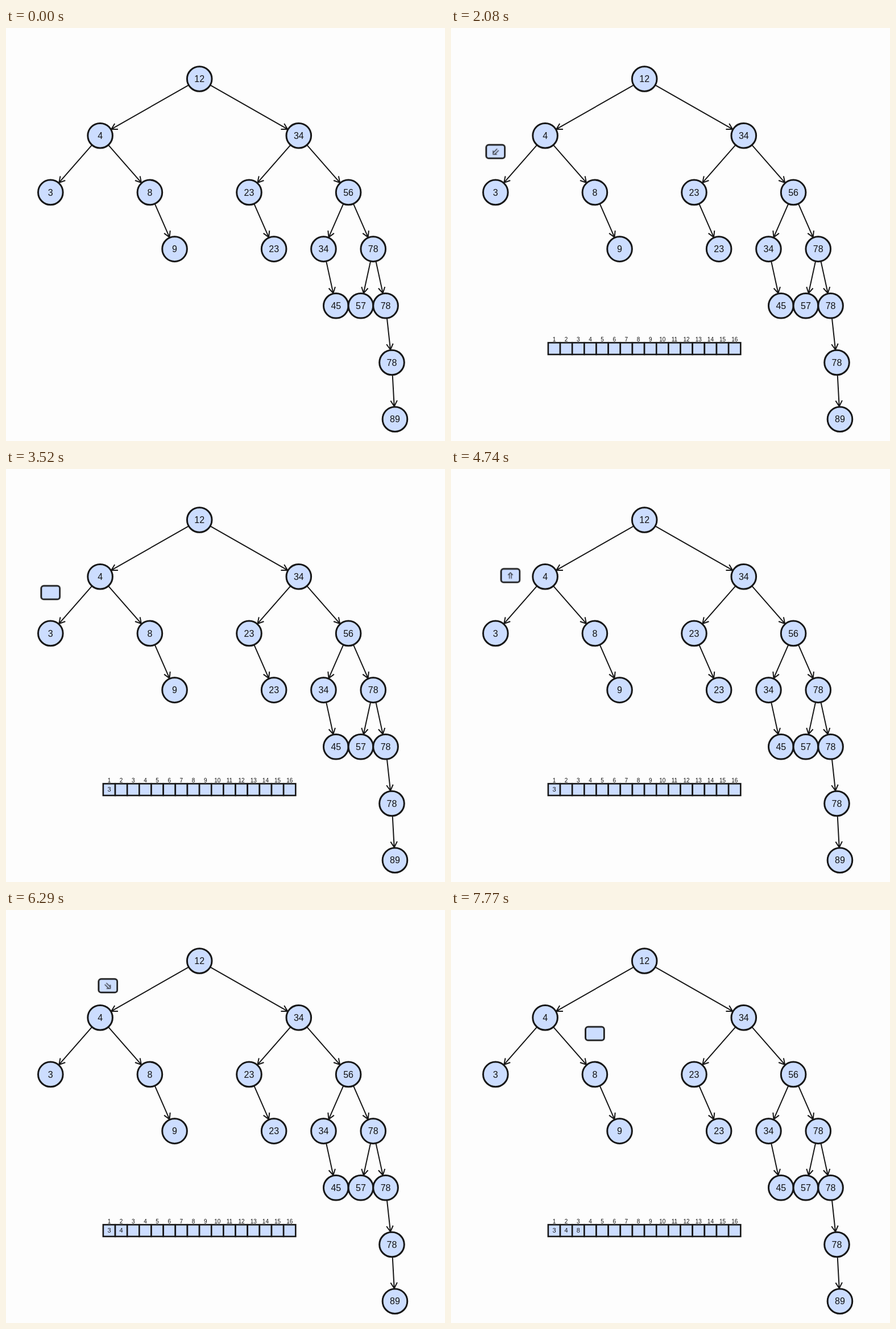
Recreate the animation shown at these times as an HTML page. Size 772 px wide and 726 px high, loop 8 s.

```html
<!DOCTYPE html>
<html lang="en">
<head>
<meta charset="utf-8">
<title>In-order tree walk</title>
<style>
html, body { margin: 0; width: 100%; height: 100%; overflow: hidden; background: #fdfdfd; }
svg { display: block; }
text { font: 16px "Liberation Sans", Arial, sans-serif; text-anchor: middle; fill: #111; stroke: none; }
.small text { font-size: 10px; }
.small .value { font-size: 11px; }
circle, rect { fill: #cdf; stroke: #171717; stroke-width: 3; }
.small rect { stroke-width: 2.6; }
.line { fill: none; stroke: #171717; stroke-width: 2; }
.sign path { fill: none; stroke: #171717; stroke-width: 1.1; }
.sign .strike { stroke-width: 1.5; }

/* One 8 s clock; the small lead keeps step edges clear of frame times. */
.a { animation: 8s step-end -5ms infinite; }
#array { animation-name: array; }
#box { animation-name: box, box-on; }
#left { animation-name: left; }
#right { animation-name: right; }
#up { animation-name: up; }
#strike { animation-name: strike; }
#ball3 { animation-name: ball3, ball3-on; }
#ball4 { animation-name: ball4, ball4-on; }
#ball8 { animation-name: ball8, ball8-on; }
#val3 { animation-name: val3; }
#val4 { animation-name: val4; }
#val8 { animation-name: val8; }

@keyframes array { 0% { opacity: 0 } 10.25%, 100% { opacity: 1 } }
@keyframes box-on { 0% { opacity: 0 } 10.875%, 100% { opacity: 1 } }
@keyframes left { 0%, 33.375%, 87.75%, 100% { opacity: 0 } 14.375%, 80.375% { opacity: 1 } }
@keyframes right { 0%, 55%, 80.375%, 100% { opacity: 0 } 47.625%, 74.75% { opacity: 1 } }
@keyframes up { 0%, 61.125%, 100% { opacity: 0 } 55% { opacity: 1 } }
@keyframes strike {
  0%, 33.375%, 55%, 87.75%, 100% { opacity: 0 }
  29.875%, 51.375%, 84% { opacity: 1 }
}
@keyframes box {
  0% { transform: translate(340.2px, 17.8px) }
  18.75% { transform: translate(340.2px, 17.8px); animation-timing-function: steps(6, jump-start) }
  21% { transform: translate(165.6px, 117.5px) }
  24.625% { transform: translate(165.6px, 117.5px); animation-timing-function: steps(5, jump-start) }
  26.3125% { transform: translate(78.3px, 217.2px) }
  59.25% { transform: translate(84.1px, 210.6px); animation-timing-function: steps(4, jump-start) }
  60.75% { transform: translate(165.6px, 117.5px) }
  78.625% { transform: translate(160.9px, 112.1px); animation-timing-function: steps(5, jump-start) }
  80.375%, 100% { transform: translate(252.9px, 217.2px) }
}
@keyframes ball3-on { 0%, 44%, 100% { opacity: 0 } 34.125% { opacity: 1 } }
@keyframes ball3 {
  0% { transform: translate(78.3px, 288.9px) }
  38% { transform: translate(79.9px, 290.3px); animation-timing-function: steps(10, jump-start) }
  42.5833%, 100% { transform: translate(340.2px, 519.6px) }
}
@keyframes ball4-on { 0%, 71.125%, 100% { opacity: 0 } 61.125% { opacity: 1 } }
@keyframes ball4 {
  0% { transform: translate(165.6px, 189.2px) }
  65% { transform: translate(169.5px, 196.7px); animation-timing-function: steps(12, jump-start) }
  69.5%, 100% { transform: translate(340.2px, 519.6px) }
}
@keyframes ball8-on { 0%, 97.125%, 100% { opacity: 0 } 88.375% { opacity: 1 } }
@keyframes ball8 {
  0% { transform: translate(252.9px, 288.9px) }
  92.25% { transform: translate(252.9px, 288.9px); animation-timing-function: steps(8, jump-start) }
  95.25%, 100% { transform: translate(340.2px, 519.6px) }
}
@keyframes val3 { 0% { opacity: 0 } 44%, 100% { opacity: 1 } }
@keyframes val4 { 0% { opacity: 0 } 71.125%, 100% { opacity: 1 } }
@keyframes val8 { 0% { opacity: 0 } 97.125%, 100% { opacity: 1 } }
</style>
</head>
<body>
<svg width="772" height="726" viewBox="0 0 772 726">
  <defs>
    <path id="arrow" d="M-1.7 5.4V-3.6M1.7 5.4V-3.6M-4.3 -1L0 -5.4L4.3 -1"/>
  </defs>
  <g id="edges" class="line"></g>
  <g id="nodes"></g>
  <g id="array" class="a small"></g>
  <g id="box" class="a">
    <rect x="-16.4" y="-11.9" width="32.8" height="23.8" rx="4.5" style="stroke-width:2.8"/>
    <g class="sign">
      <g id="left" class="a"><path transform="translate(0 .7) rotate(-135) scale(1.1)" d="M-1.7 5.4V-3.6M1.7 5.4V-3.6M-4.3 -1L0 -5.4L4.3 -1"/></g>
      <g id="right" class="a"><path transform="translate(0 .7) rotate(135) scale(1.1)" d="M-1.7 5.4V-3.6M1.7 5.4V-3.6M-4.3 -1L0 -5.4L4.3 -1"/></g>
      <g id="up" class="a"><path transform="translate(0 .2)" d="M-1.7 5.4V-3.6M1.7 5.4V-3.6M-4.3 -1L0 -5.4L4.3 -1"/></g>
      <g id="strike" class="a"><path class="strike" d="M-6 -.2H6.5"/></g>
    </g>
  </g>
  <g id="balls"></g>
</svg>
<script>
const NS = 'http://www.w3.org/2000/svg';
const RADIUS = 21.8, TIP = 22.6, LEVEL = 99.7, SPREAD = 174.6;
const get = id => document.getElementById(id);

function add(parent, tag, attrs, label) {
  const el = document.createElementNS(NS, tag);
  for (const key in attrs) el.setAttribute(key, attrs[key]);
  if (label !== undefined) el.textContent = label;
  return parent.appendChild(el);
}

function ball(parent, label, attrs) {
  const g = add(parent, 'g', attrs);
  add(g, 'circle', { r: RADIUS });
  add(g, 'text', { y: 5.6 }, label);
}

function edge(x1, y1, x2, y2) {
  const angle = Math.atan2(y2 - y1, x2 - x1);
  const length = Math.hypot(x2 - x1, y2 - y1);
  add(get('edges'), 'path', {
    transform: `translate(${x1} ${y1}) rotate(${angle * 180 / Math.PI})`,
    d: `M${RADIUS} 0H${length - TIP}m-10.2 -5.8l10.2 5.8l-10.2 5.8`
  });
}

// A node is [value, left, right].
function grow([value, ...children], x, y, spread) {
  ball(get('nodes'), value, { transform: `translate(${x} ${y})` });
  children.forEach((child, side) => {
    if (!child) return;
    const cx = x + (side ? spread : -spread), cy = y + LEVEL;
    edge(x, y, cx, cy);
    grow(child, cx, cy, spread / 2);
  });
}

grow([12,
  [4, [3], [8, null, [9]]],
  [34,
    [23, null, [23]],
    [56,
      [34, null, [45]],
      [78, [57], [78, null, [78, null, [89]]]]]]
], 340.2, 89.5, SPREAD);

const CELL = 21.15, sorted = [3, 4, 8];
for (let i = 0; i < 16; i++) {
  const x = 170.9 + i * CELL, mid = x + CELL / 2;
  add(get('array'), 'rect', { x, y: 553.2, width: CELL, height: 20.7 });
  add(get('array'), 'text', { x: mid, y: 551.4 }, i + 1);
}
sorted.forEach((n, i) => {
  add(get('array'), 'text', { id: 'val' + n, class: 'a value', x: 170.9 + (i + .5) * CELL, y: 567.2 }, n);
  ball(get('balls'), n, { id: 'ball' + n, class: 'a' });
});
</script>
</body>
</html>
```
